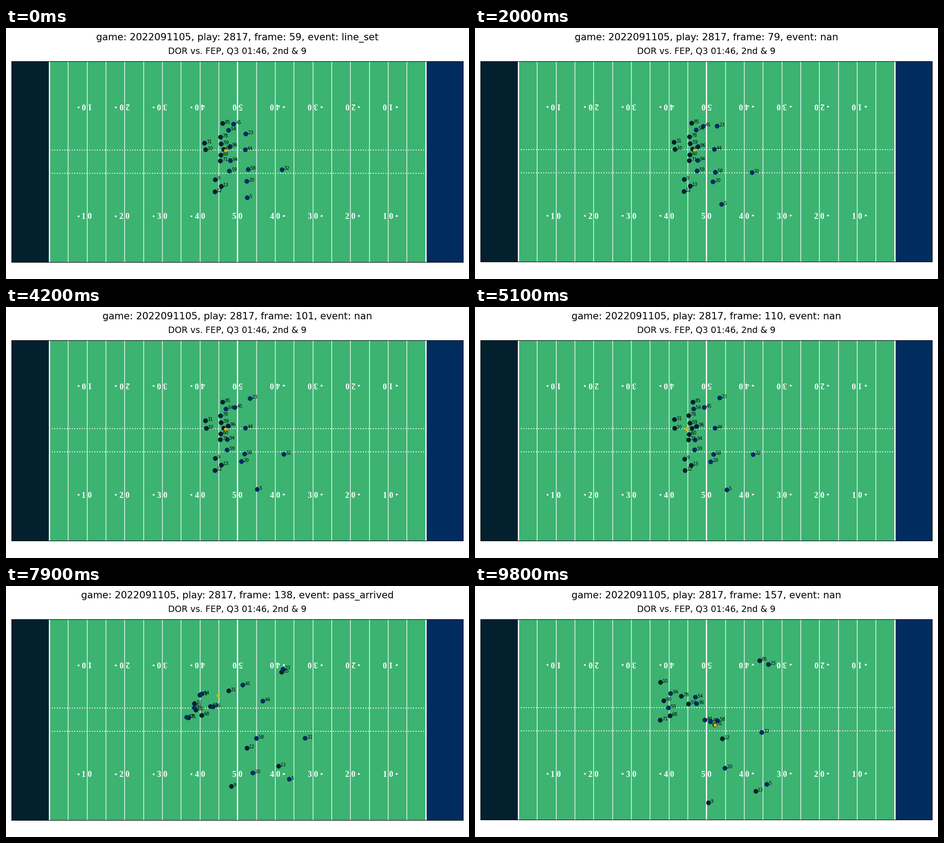
Recreate the animation shown at these times as a matplotlib script. Size 1017 px wide and 551 px high, loop 9.9 s.

```python
import numpy as np
import matplotlib.pyplot as plt
from matplotlib.animation import FuncAnimation
from matplotlib.patches import Rectangle

W, H, DPI = 1017, 551, 64
FRAMES, INTERVAL = 99, 100
FIRST_TICK = 59
LEFT, RIGHT, TOP, BOTTOM = 12.3, 1004.45, 72.7, 513.2
YARD = (RIGHT - LEFT) / 120
HOME, AWAY, BALL = "#03202f", "#002c5f", "#e0b70a"
LINE_UP, SNAP, READ, THROW, ARRIVE, CATCH, END = 0, 48, 65, 75, 79, 81, 98
EVENTS = {LINE_UP: "line_set", SNAP: "ball_snap", THROW: "pass_forward",
          ARRIVE: "pass_arrived", CATCH: "pass_outcome_caught", 93: "tackle"}
STAGES = (LINE_UP, SNAP, READ, ARRIVE, END)
clock = np.arange(FRAMES)


def px(size):
    """Pixels to points."""
    return size * 72 / DPI


def run(*stops):
    """Smooth run through the stops of the last stages, at rest at the snap."""
    times = np.array(STAGES[-len(stops):], float)
    points = np.array(stops, float)
    slopes = np.gradient(points, times, axis=0)
    slopes[times == SNAP] = 0
    t = np.clip(clock, times[0], None)
    k = np.clip(np.searchsorted(times, t, side="right") - 1, 0, len(times) - 2)
    h = (times[k + 1] - times[k])[:, None]
    u = (t - times[k])[:, None] / h
    ease = u * u * (3 - 2 * u)
    return (points[k] + ease * (points[k + 1] - points[k])
            + h * u * (1 - u) * ((1 - u) * slopes[k] - u * slopes[k + 1]))


players = []


def add_player(team, number, *stops):
    path = run(*stops)
    players.append((team, number, path))
    return path


# The offence waits for the snap, the defence shifts before it.
add_player(HOME, 85, (476, 209), (533.7, 205), (605.5, 188.6), (625.5, 164))
add_player(HOME, 78, (471.4, 239), (439.8, 233.3), (426, 239), (453.3, 242))
add_player(HOME, 59, (472.7, 254), (464, 269), (449.2, 264), (469, 259))
add_player(HOME, 68, (478.3, 266), (450.3, 276), (430, 283.5), (428.5, 285))
add_player(HOME, 60, (472, 278.7), (445.2, 291.5), (417.2, 271.8), (414.8, 252))
add_player(HOME, 71, (470.9, 291.3), (436.5, 297), (401, 288.8), (407, 294.5))
add_player(HOME, 9, (459.8, 332.5), (476.8, 371), (495.3, 439.4), (513, 476))
add_player(HOME, 13, (473.1, 347), (521.4, 366), (599, 395), (617, 450.7))
add_player(HOME, 12, (459.2, 359), (499.2, 358), (529.6, 355.4), (543.5, 335.4))
passer = add_player(HOME, 10, (438.5, 266.6), (440.3, 266.4), (417.5, 264.6),
                    (414, 257.6), (407.6, 211.5))
receiver = add_player(HOME, 31, (436, 252.2), (438.4, 249.7), (447, 216.3),
                      (489.4, 229.6), (526.8, 305))

add_player(AWAY, 45, (500, 210.5), (503, 221), (513.5, 215.5), (520.2, 216.8), (517.5, 298))
add_player(AWAY, 54, (489, 224), (483, 224), (442.6, 226), (430, 236.6), (484.2, 244.2))
add_player(AWAY, 23, (526.8, 232), (536.5, 200), (562.4, 192.2), (608.5, 182.3), (644.5, 172.3))
add_player(AWAY, 96, (492.5, 259.5), (488, 261), (467, 273.3), (455.5, 264.6), (486.8, 258.4))
add_player(AWAY, 44, (525.8, 266.8), (526, 266), (546.4, 265), (564.2, 252.2), (505, 294.2))
add_player(AWAY, 94, (493, 290.6), (486, 291), (443, 295.5), (413.5, 267), (429.8, 236))
add_player(AWAY, 59, (490.6, 313.5), (485.4, 314), (436.8, 304.8), (397, 287.6), (425, 267.5))
add_player(AWAY, 58, (532.2, 310), (524, 323), (532, 332), (550.2, 334), (533, 296))
add_player(AWAY, 20, (529, 336), (517, 339.3), (529.8, 360), (542.3, 409.8), (549, 400))
add_player(AWAY, 32, (606.5, 310.5), (610.5, 323.8), (624, 327), (657, 333.6), (629.8, 321.5))
add_player(AWAY, 5, (530, 372), (552.6, 401.3), (576, 408.5), (622.4, 423.6), (641.2, 435.4))


def handover(start, end):
    return np.clip((clock - start) / (end - start), 0, 1)[:, None]


# The ball goes from its spot to the passer, then to the receiver.
spot = np.array([482, 268])
held = spot + handover(SNAP, SNAP + 7) * (passer + [3.5, 2] - spot)
ball_path = held + handover(THROW, CATCH) * (receiver + [0.6, -0.2] - held)

plt.rcParams["font.family"] = "DejaVu Sans"
fig = plt.figure(figsize=(W / DPI, H / DPI), dpi=DPI, facecolor="white")
title = fig.text(508.4 / W, 1 - 27.3 / H, "", ha="center", va="baseline", fontsize=px(21.2))
fig.text(508.4 / W, 1 - 56.3 / H, "DOR vs. FEP, Q3 01:46, 2nd & 9",
         ha="center", va="baseline", fontsize=px(19))
field = fig.add_axes([0, 0, 1, 1], facecolor="#3cb371")
field.set(xlim=(LEFT, RIGHT), ylim=(BOTTOM, TOP), xticks=[], yticks=[])
for spine in field.spines.values():
    spine.set(linewidth=px(1.1), color="black", zorder=8)


def yard_x(yard):
    return LEFT + yard * YARD


def draw_field():
    for start, color in ((0, HOME), (110, AWAY)):
        field.add_patch(Rectangle((yard_x(start), TOP), 10 * YARD, BOTTOM - TOP,
                                  facecolor=color, linewidth=0, zorder=0.5))
    for yard in range(10, 111, 5):
        width = 2.78 if yard in (10, 60, 110) else 1.39
        field.plot([yard_x(yard)] * 2, [TOP, BOTTOM], color="white", lw=px(width), zorder=2)
    for y in (267, 318):
        field.plot([yard_x(10), yard_x(110)], [y, y], ":", color="white", lw=px(2.08), zorder=2)
    for yard in range(20, 101, 10):
        x = yard_x(yard)
        label = " ".join(str(50 - abs(yard - 60)))
        for baseline, angle, arrow_y in ((165.8, 180, 173.5), (418.8, 0, 412.3)):
            field.text(x, baseline, label, color="white", fontsize=px(18), rotation=angle,
                       family="Liberation Serif", weight="bold", ha="center",
                       va="baseline", rotation_mode="anchor", zorder=3)
            if yard != 60:
                side = np.sign(yard - 60)
                field.plot(x + side * 20, arrow_y, marker=">" if side > 0 else "<",
                           color="white", ms=px(5), mew=0, zorder=3)


draw_field()
paths = np.array([path for _, _, path in players])
dots = field.scatter(*paths[:, 0].T, s=px(10.4) ** 2, lw=0, zorder=5,
                     c=[team for team, _, _ in players])
ball = field.scatter(*ball_path[0], s=px(7.6) ** 2, lw=0, zorder=6, c=BALL)
labels = [field.text(0, 0, str(number), fontsize=px(9.7), va="baseline", zorder=7)
          for _, number, _ in players]


def update(i):
    event = EVENTS.get(i, "nan")
    title.set_text(f"game: 2022091105, play: 2817, frame: {FIRST_TICK + i}, event: {event}")
    # An underscore makes the title deeper and pushes the field down a little.
    drop = 0.6 if "_" in event else 0
    field.set_position([LEFT / W, 1 - (BOTTOM + drop) / H,
                        (RIGHT - LEFT) / W, (BOTTOM - TOP) / H])
    dots.set_offsets(paths[:, i])
    ball.set_offsets(ball_path[i:i + 1])
    for label, (x, y) in zip(labels, paths[:, i]):
        label.set_position((x + 4.2, y + 0.4))
    return [title, dots, ball, *labels]


anim = FuncAnimation(fig, update, frames=FRAMES, interval=INTERVAL, repeat=True, blit=False)
plt.show()
```
